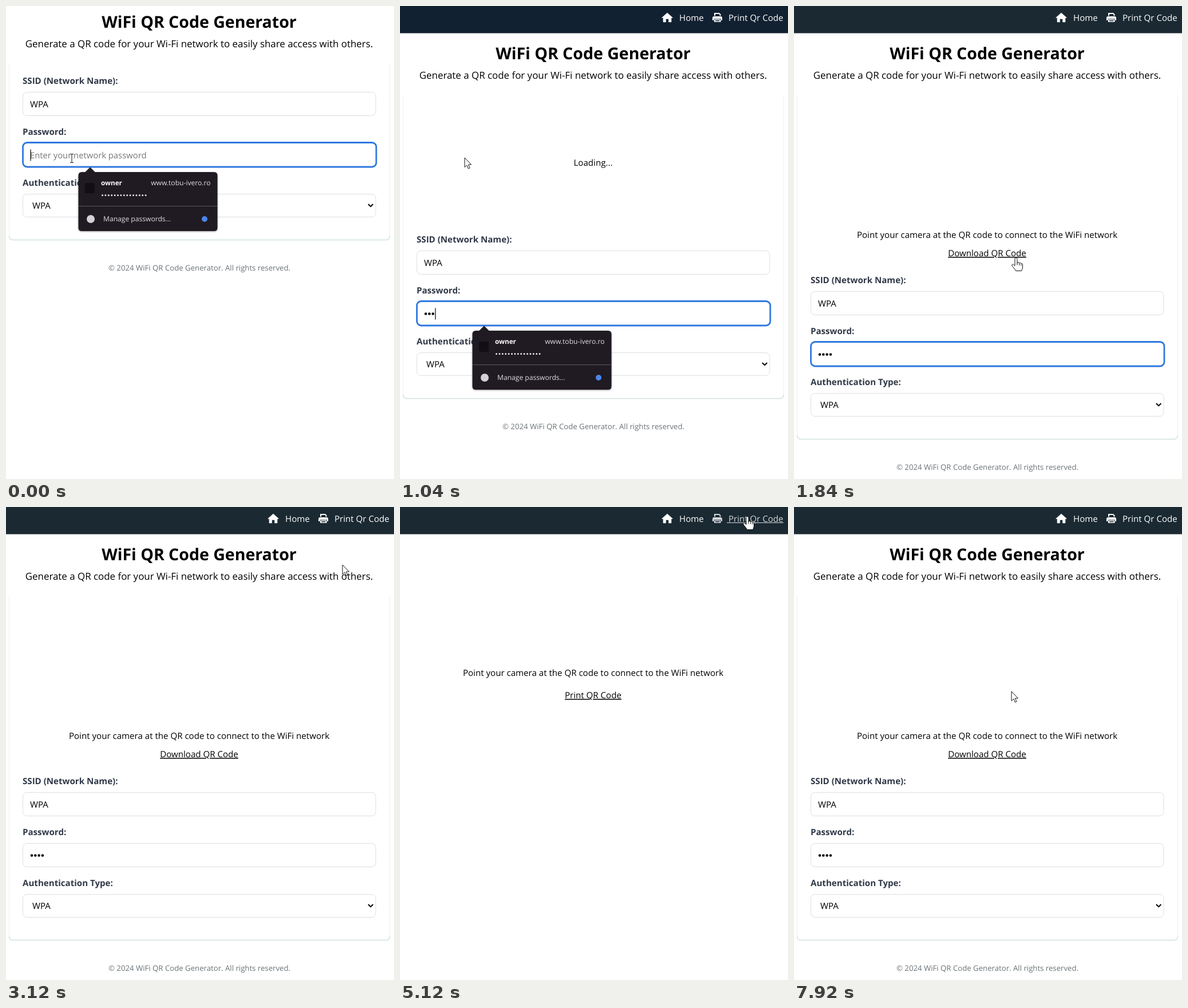
Write an HTML page that moves like this. It is 678 px wide and 826 px high and loops after 8000 ms.

```html
<!DOCTYPE html>
<html lang="en">
<head>
<meta charset="utf-8">
<title>WiFi QR Code Generator</title>
<style>
  html, body { margin: 0; width: 100%; height: 100%; overflow: hidden; background: #fff; }
  svg { display: block; width: 678px; height: 826px; }
  text { font-family: "Open Sans", "Noto Sans", sans-serif; font-size: 15.1px; text-rendering: geometricPrecision; }
  .mid { text-anchor: middle; }
  .title { font-size: 28.5px; font-weight: 700; }
  .lead { font-size: 16.9px; }
  .label { font-size: 15.1px; font-weight: 700; fill: #303947; }
  .foot { font-size: 13.2px; fill: #6b7378; }
  .link { text-decoration: underline; text-decoration-thickness: 1px; }
  .hint { font-size: 14.8px; fill: #777; }
  .field { fill: #fff; stroke: #dcdfe1; }
  .dots { stroke-linecap: round; }
  .popup text { font-size: 12.1px; fill: #e2dfe4; }
  .popup .user { font-size: 11.7px; font-weight: 700; fill: #fff; }
  .nav { fill: #fff; }
  .hover { fill: #d2d6da; }
  .rule { display: none; }
  .hover .rule { display: inline; }
  .pointer path { stroke: #111; stroke-linejoin: round; }
</style>
</head>
<body>
<svg viewBox="0 0 678 826">
  <defs>
    <g id="popup" class="popup">
      <path d="M133 290h5.5l8.5-8.5 8.5 8.5H363.5q6 0 6 6v91q0 6-6 6H132.5q-6 0-6-6v-91q0-6 6-6z" fill="#201a22"
            style="filter: drop-shadow(0 1px 1.5px #0006)"/>
      <rect x="138" y="309" width="17" height="18" rx="2" fill="#120e14"/>
      <path d="M127 349.5H369" stroke="#5b555f"/>
      <text class="user" x="166" y="313">owner</text>
      <text x="357.5" y="313" text-anchor="end">www.tobu-ivero.ro</text>
      <path class="dots" d="M168.5 330.5H244.5" stroke="#e8e6ea" stroke-width="3" stroke-dasharray="0 5.4"/>
      <circle cx="148" cy="372" r="7" fill="#d3d1d6"/>
      <text x="170" y="376">Manage passwords...</text>
      <circle cx="347" cy="372" r="5" fill="#4a86e8"/>
    </g>
  </defs>

  <g id="home">
    <g id="head">
      <text class="title mid" x="337.5" y="38">WiFi QR Code Generator</text>
      <text class="lead mid" x="337.5" y="72">Generate a QR code for your Wi-Fi network to easily share access with others.</text>
    </g>
    <path id="sides" fill="none" stroke="#edf2f2"/>
    <path id="base" fill="none" stroke="#cfe4e1" stroke-width="1.5"/>
    <text id="loading" class="mid" x="337.5" y="279">Loading...</text>
    <text id="download" class="mid link" x="337.5" y="437">Download QR Code</text>
    <g id="form">
      <text class="label" x="29" y="136">SSID (Network Name):</text>
      <rect class="field" x="29.5" y="150.5" width="616.5" height="41" rx="7"/>
      <text x="42" y="177">WPA</text>
      <text class="label" x="29" y="225">Password:</text>
      <rect class="field" x="29.5" y="239.5" width="616.5" height="41" rx="7"/>
      <rect id="ring" x="29.5" y="238.5" width="617.5" height="42.5" rx="7.5" fill="#fff" stroke="#2e78e0" stroke-width="2.8"/>
      <text id="hint" class="hint" x="42" y="266">Enter your network password</text>
      <path id="secret" class="dots" stroke="#000" stroke-width="4.6" stroke-dasharray="0 6.3"/>
      <path id="caret" stroke="#000" stroke-width="1.2"/>
      <text class="label" x="29" y="314">Authentication Type:</text>
      <rect class="field" x="29.5" y="328.5" width="616.5" height="40" rx="7"/>
      <text x="46" y="354">WPA</text>
      <path d="M633 346l4.2 4.2 4.2-4.2" fill="none" stroke="#000" stroke-width="2"/>
      <text class="foot mid" x="338" y="462">© 2024 WiFi QR Code Generator. All rights reserved.</text>
    </g>
    <use id="stale" href="#popup"/>
    <use id="fresh" href="#popup" y="277"/>
  </g>

  <g id="print">
    <text class="mid link" x="337.5" y="334">Print QR Code</text>
  </g>
  <text id="point" class="mid" x="337.5">Point your camera at the QR code to connect to the WiFi network</text>

  <g id="nav" class="nav">
    <rect id="bar" width="678" height="47.5"/>
    <g id="navHome">
      <path d="M457.5 20.5L467 12l9.5 8.5H474V28h-4.5v-5.5h-5V28H460v-7.5z" stroke="#fff" stroke-width=".6" stroke-linejoin="round"/>
      <text x="488" y="25.5">Home</text>
      <path class="rule" d="M485 27h46v1h-46z"/>
    </g>
    <g id="navPrint">
      <path fill-rule="evenodd" d="M549 17v-5h9l2.500 2.500V17h-2v-2l-1-1H551v3zM546 25v-4q0-3 3-3h11q3 0 3 3v4h-2v-2.500h-12.500V25zM549 23.500h11.500V28H549zM551 25h7.500v1.500H551z"/>
      <text x="574" y="25.5">Print Qr Code</text>
      <path class="rule" d="M571 27h99v1h-99z"/>
    </g>
  </g>

  <g id="pointer" class="pointer">
    <path id="beam" d="M-3-7.5h2q1 0 1 1 0-1 1-1h2M0-6.5v13M-3 7.5h2q1 0 1-1 0 1 1 1h2" fill="none"/>
    <path id="arrow" d="M0 0V16.5L3.8 13l2.6 6 2.6-1.1L6.4 12h5.1z" fill="#fff"/>
    <g id="hand">
      <path d="M-2 1.5a2 2 0 0 1 4 0V9a1.9 1.9 0 0 1 3.7.3 1.8 1.8 0 0 1 3.3.7 1.6 1.6 0 0 1 2.5 1.2V16q0 3-2 6.5H-.5q-1-2.5-3-4.5-2.6-3-3.7-5a1.7 1.7 0 0 1 2.8-1.6L-2 13.5z" fill="#fff"/>
      <path d="M2 9v3.5M5.7 9.5V13M9 10.5v3" fill="none"/>
    </g>
  </g>
</svg>

<script>
const LOOP = 8000;
const el = {};
document.querySelectorAll("svg [id]").forEach(n => el[n.id] = n);

const KEYS = [560, 880, 1000, 1280];
const BLUR = 2320;
// Page layouts: time, name
const VIEWS = [[0, "short"], [560, "loading"], [1360, "ready"], [5040, "print"], [6960, "ready"]];
const BARS = [[0, "#101a3a"], [960, "#122131"], [1360, "#1a2932"]];
const SHAPES = [[0, "beam"], [560, "arrow"], [1680, "hand"], [2400, "arrow"], [4800, "hand"],
                [6000, "arrow"], [6640, "hand"], [7520, "arrow"]];
const HOVERS = [[0, ""], [4800, "navPrint"], [6000, ""], [6640, "navHome"], [7520, ""]];
// Pointer path: time, x, y
const PATH = [[0, 115, 266], [559, 115, 266], [560, 113, 265], [1400, 113, 265], [1760, 388, 440],
              [2320, 388, 440], [3040, 588, 101], [3160, 588, 101], [3600, 578, 112], [4000, 584, 104],
              [4160, 584, 104], [4880, 607, 17], [5320, 607, 17], [5440, 603, 18], [5600, 607, 17],
              [5999, 607, 17], [6000, 116, 347], [6360, 116, 347], [6720, 508, 17],
              [7400, 508, 17], [7800, 380, 322], [LOOP, 380, 322]];
const FORM_Y = { short: 0, loading: 277, ready: 348, print: 0 };

const show = (n, on) => n.style.display = on ? "" : "none";
const shift = (n, x, y) => n.setAttribute("transform", `translate(${x} ${y})`);
const pick = (table, t) => table.findLast(row => row[0] <= t)[1];

function pointerAt(t) {
  const i = PATH.findLastIndex(p => p[0] <= t);
  const a = PATH[i], b = PATH[i + 1] || a;
  const u = b === a ? 0 : (t - a[0]) / (b[0] - a[0]);
  const e = u * u * (3 - 2 * u);
  return [1, 2].map(k => Math.round(a[k] + (b[k] - a[k]) * e));
}

function drawCard(top, bottom) {
  el.sides.setAttribute("d", `M5.5 ${top}V${bottom - 7}M670.5 ${top}V${bottom - 7}`);
  el.base.setAttribute("d", `M5.5 ${bottom - 7}q0 7 7 7H663.5q7 0 7-7`);
}

function drawPassword(t) {
  const typed = KEYS.filter(k => k <= t);
  const n = typed.length;
  const focused = t < BLUR;
  show(el.ring, focused);
  show(el.hint, !n);
  show(el.secret, n);
  el.secret.setAttribute("d", `M45 260.5h${6.3 * (n - 1) + 0.1}`);
  const idle = t - (typed[n - 1] || 0);
  show(el.caret, focused && Math.floor(idle / 500) % 2 === 0);
  el.caret.setAttribute("d", `M${43 + 6.3 * n} 250.5v20`);
}

function render(t) {
  const view = pick(VIEWS, t);
  const y = FORM_Y[view], nav = view !== "short", print = view === "print";
  show(el.home, !print);
  show(el.print, print);
  show(el.nav, nav);
  show(el.loading, view === "loading");
  show(el.download, view === "ready");
  show(el.point, view === "ready" || print);
  el.point.setAttribute("y", print ? 294.5 : 405);
  shift(el.head, 0, nav ? 55 : 0);
  shift(el.form, 0, y);
  drawCard(nav ? 156 : 101, 408.5 + y);
  drawPassword(t);
  show(el.stale, t < 960);
  show(el.fresh, view === "loading");
  el.bar.setAttribute("fill", pick(BARS, t));

  const hover = pick(HOVERS, t);
  for (const id of ["navHome", "navPrint"]) el[id].classList.toggle("hover", id === hover);
  const shape = pick(SHAPES, t);
  for (const id of ["beam", "arrow", "hand"]) show(el[id], id === shape);
  shift(el.pointer, ...pointerAt(t));
}

const start = performance.now();
function tick() {
  render((performance.now() - start) % LOOP);
  requestAnimationFrame(tick);
}
tick();
</script>
</body>
</html>
```
